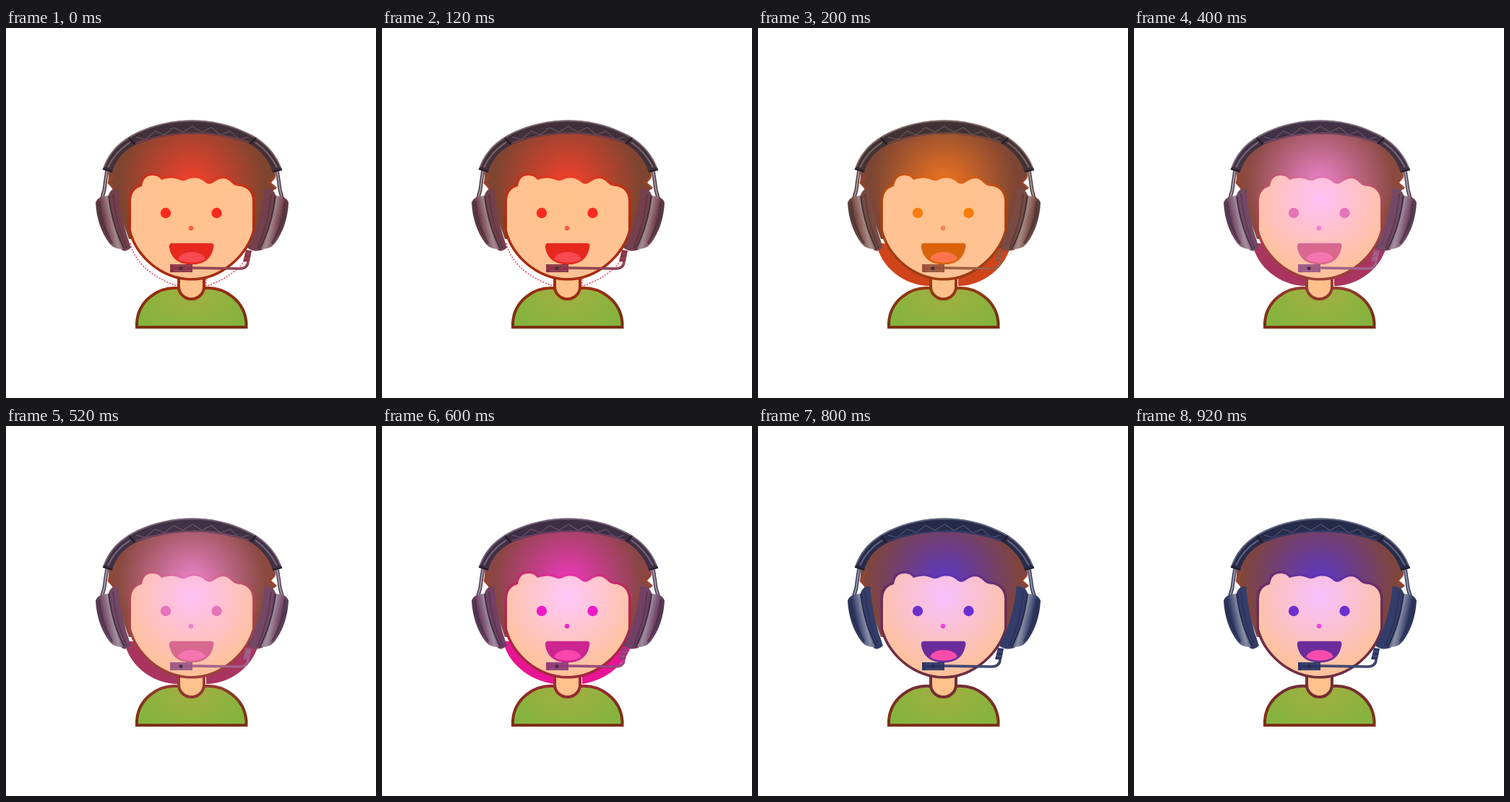
An HTML page with a canvas for the animation above (1000 ms loop, 512 px wide and 512 px high).

```html
<!DOCTYPE html>
<html lang="en">
<head>
<meta charset="utf-8">
<title>Headset glow</title>
<style>
html, body { margin: 0; width: 100%; height: 100%; overflow: hidden; background: #fff; }
canvas { display: block; width: 100vmin; height: 100vmin; }
</style>
</head>
<body>
<canvas id="stage" width="512" height="512"></canvas>
<script>
const ctx = document.getElementById('stage').getContext('2d');
const STEP = 200;

const moods = [
  { glow: '#f5402c', hair: '#7e4530', line: '#b52c10', skin: '#ffc18c', eye: '#fb2a20', nose: '#ff5848',
    mouth: '#e6281f', tongue: '#f84850', dark: '#40303a', pad: '#74404c', metal: '#a48a90', mic: '#8c3446', halo: '#f03a58', spread: 0.1, dotted: true },
  { glow: '#f07420', hair: '#7c4534', line: '#a8420f', skin: '#ffc18c', eye: '#f67c0c', nose: '#f58058',
    mouth: '#da640c', tongue: '#ff744c', dark: '#403234', pad: '#784a42', metal: '#a88c86', mic: '#9c5238', halo: '#d0441c', spread: 1 },
  { glow: '#ee82cc', hair: '#8a4a40', line: '#a84448', skin: '#ffc0f6', eye: '#e674b8', nose: '#ee80c8',
    mouth: '#d8688e', tongue: '#f674b0', dark: '#403144', pad: '#744864', metal: '#a490a0', mic: '#a05a86', halo: '#aa3460', spread: 1 },
  { glow: '#ee38bc', hair: '#8a4644', line: '#b02648', skin: '#ffc8fa', eye: '#ee18c8', nose: '#f028c4',
    mouth: '#cc2490', tongue: '#f846ac', dark: '#3e2f45', pad: '#714064', metal: '#a08ca2', mic: '#963a78', halo: '#e81494', spread: 0.55 },
  { glow: '#5c36c8', hair: '#7e4540', line: '#6c2c50', skin: '#f8c0ff', eye: '#6c30d0', nose: '#f044d8',
    mouth: '#6c2c9c', tongue: '#f84cac', dark: '#272b4a', pad: '#343d6a', metal: '#8b90a6', mic: '#2c3564', halo: '#fff', spread: 0 }
];

const shape = d => new Path2D(d);
const hair = shape('M142 206 C142 178 164 157 200 150 Q257 137 316 150 C352 158 374 178 373 206 L365 214 L374 222 Q366 226 362 240 L344 292 H170 L152 240 Q152 226 141 215 Z');
const notches = shape('M149 203 L142 214 L150 222 M372 206 L365 214 L374 222');
const face = shape('M173 240 Q173 223 188 219 Q190 204 203 204 Q211 204 215 210 Q230 205 240 210 Q246 213 252 209 Q264 205 274 212 Q281 219 288 213 Q302 203 312 214 Q316 219 325 219 Q341 223 341 240 V280 C333 312 298 346 257 346 C216 346 181 314 173 280 Z');
const shirt = shape('M181 414 V408 C183 377 211 358 238 360 H275 C302 358 330 377 332.5 408 V414 Z');
const neck = shape('M239 344 V358 A17.5 17 0 0 0 274 358 V344');
const mouth = shape('M230 299 H284 Q287 299 286 303 Q282 326 257 326 Q231 326 227 303 Q227 299 230 299 Z');
const band = shape('M134 195 C144 166 164 153 182 144 C229 122 287 122 332 144 C355 154 373 171 382 196 L369 199 C363 181 352 169 337 160 C286 142 230 142 180 161 C162 170 152 182 147 199 Z');
const bandTop = shape('M136 192 C145 167 164 154 182 145 C229 123 287 123 332 145 C355 155 371 170 380 193');
const shell = shape('M124 242 Q126 235 134 233 L142 232 Q147 274 164 306 Q150 307 143 298 Q126 275 124 242 Z');

function radial(x, y, r, ...colors) {
  const g = ctx.createRadialGradient(x, y, 0, x, y, r);
  colors.forEach((c, i) => g.addColorStop(i / (colors.length - 1), c));
  return g;
}

function across(x0, x1, ...colors) {
  const g = ctx.createLinearGradient(x0, 267, x1, 260);
  colors.forEach((c, i) => g.addColorStop(i / (colors.length - 1), c));
  return g;
}

function fill(path, style) {
  ctx.fillStyle = style;
  ctx.fill(path);
}

function stroke(path, style, width) {
  ctx.strokeStyle = style;
  ctx.lineWidth = width;
  ctx.stroke(path);
}

function dot(x, y, rx, style, ry = rx) {
  ctx.fillStyle = style;
  ctx.beginPath();
  ctx.ellipse(x, y, rx, ry, 0, 0, Math.PI * 2);
  ctx.fill();
}

function drawHalo({ spread: s, halo, dotted }) {
  if (!s) return;
  const x = 173 - 9 * s, y = 322 + 8 * s, low = 345 + 12 * s;
  const rim = shape(`M${x} 298 C${x + 5} ${y} 202 ${low} 238 357 V340 H277 V357 C312 ${low} ${509 - x} ${y} ${514 - x} 298`);
  if (dotted) {
    ctx.setLineDash([2, 2]);
    stroke(rim, halo, 1.5);
    ctx.setLineDash([]);
  } else {
    fill(rim, halo);
  }
}

function drawPerson(m) {
  const line = radial(257, 225, 190, m.glow, m.line, '#7c3016');
  drawHalo(m);

  ctx.lineJoin = 'miter';
  fill(shirt, radial(257, 345, 90, '#a8ae42', '#84b43e'));
  stroke(shirt, line, 4);
  ctx.lineJoin = 'round';
  fill(neck, '#ffc18c');
  stroke(neck, line, 4);

  fill(hair, radial(257, 215, 102, m.glow, m.hair));
  stroke(notches, '#9a4428', 3);
  stroke(face, line, 7);
  fill(face, radial(257, 237, 112, m.skin, '#ffc294'));

  dot(221, 256, 7.2, m.eye);
  dot(291.5, 256, 7.2, m.eye);
  dot(256, 277, 3.2, m.nose);

  fill(mouth, m.mouth);
  ctx.save();
  ctx.clip(mouth);
  dot(257, 321, 19, m.tongue, 11);
  ctx.restore();
  stroke(mouth, m.mouth, 2.5);
}

function drawCup(m, wide) {
  const arm = shape('M140 196 Q137 216 136 224 L132 238');
  stroke(arm, m.dark, 5);
  stroke(arm, m.metal, 2.5);

  const top = 155 + wide * 0.3, low = 173 + wide;
  const cushion = shape(`M142 231 Q145 221 ${top} 222 Q${top + 3} 263 ${low} 304 Q${low - 8} 311 160 307 Q146 275 142 231 Z`);
  fill(cushion, across(142, 170 + wide, m.dark, m.pad, m.pad, m.pad, m.dark));
  stroke(shape('M148 229 Q151 268 167 305'), m.dark + '80', 2);

  fill(shell, across(125, 158, m.dark, m.pad, m.metal, m.pad));
  stroke(shape('M129 240 Q131 272 147 298'), m.dark + 'a0', 3);
  stroke(shape('M142 232 Q147 274 164 306'), m.dark, 2);
}

function drawBand(m) {
  fill(band, m.dark);
  stroke(bandTop, m.metal + '90', 2);
  stroke(shape('M141 193 Q151 171 172 158 M375 193 Q364 171 345 158'), m.metal + '80', 2.5);
  stroke(shape('M170 152 L178 161 M346 152 L338 160 M134 195 L147 199 M382 196 L369 199'), '#211b25', 2);

  // quilted padding
  const quilt = new Path2D();
  for (let i = 0; i <= 12; i++) {
    const x = 180 + i * 13;
    const lift = 19 * (1 - ((x - 258) / 88) ** 2);
    quilt.lineTo(x, 157 - lift + (i % 2 ? 6 : -2));
  }
  stroke(quilt, m.metal + '60', 1.3);
  stroke(shape('M180 159 C230 141 286 141 336 158'), m.pad, 2);
}

function drawMic(m) {
  const boom = shape('M335 322 Q335 333 323 333 L258 332');
  stroke(boom, m.mic, 3.5);
  stroke(boom, m.metal + '80', 1);
  fill(shape('M332 307 L340 308 L337 323 L328 323 Z'), m.mic);
  stroke(shape('M332 312 L338 313 M330 318 L337 319'), m.metal + '80', 1);
  fill(shape('M227 327 H258 V338 H227 Z'), m.mic);
  stroke(shape('M232 329 H257 M232 336 H257'), m.metal + '60', 1);
  dot(242, 332.5, 2.5, m.dark);
}

function draw(m) {
  ctx.fillStyle = '#fff';
  ctx.fillRect(0, 0, 512, 512);
  drawPerson(m);
  drawCup(m, 0);
  ctx.save();
  ctx.translate(515, 0);
  ctx.scale(-1, 1);
  drawCup(m, 8);
  ctx.restore();
  drawBand(m);
  drawMic(m);
}

const start = performance.now();
function tick() {
  const t = performance.now() - start;
  draw(moods[Math.floor(t / STEP) % moods.length]);
  requestAnimationFrame(tick);
}
tick();
</script>
</body>
</html>
```
